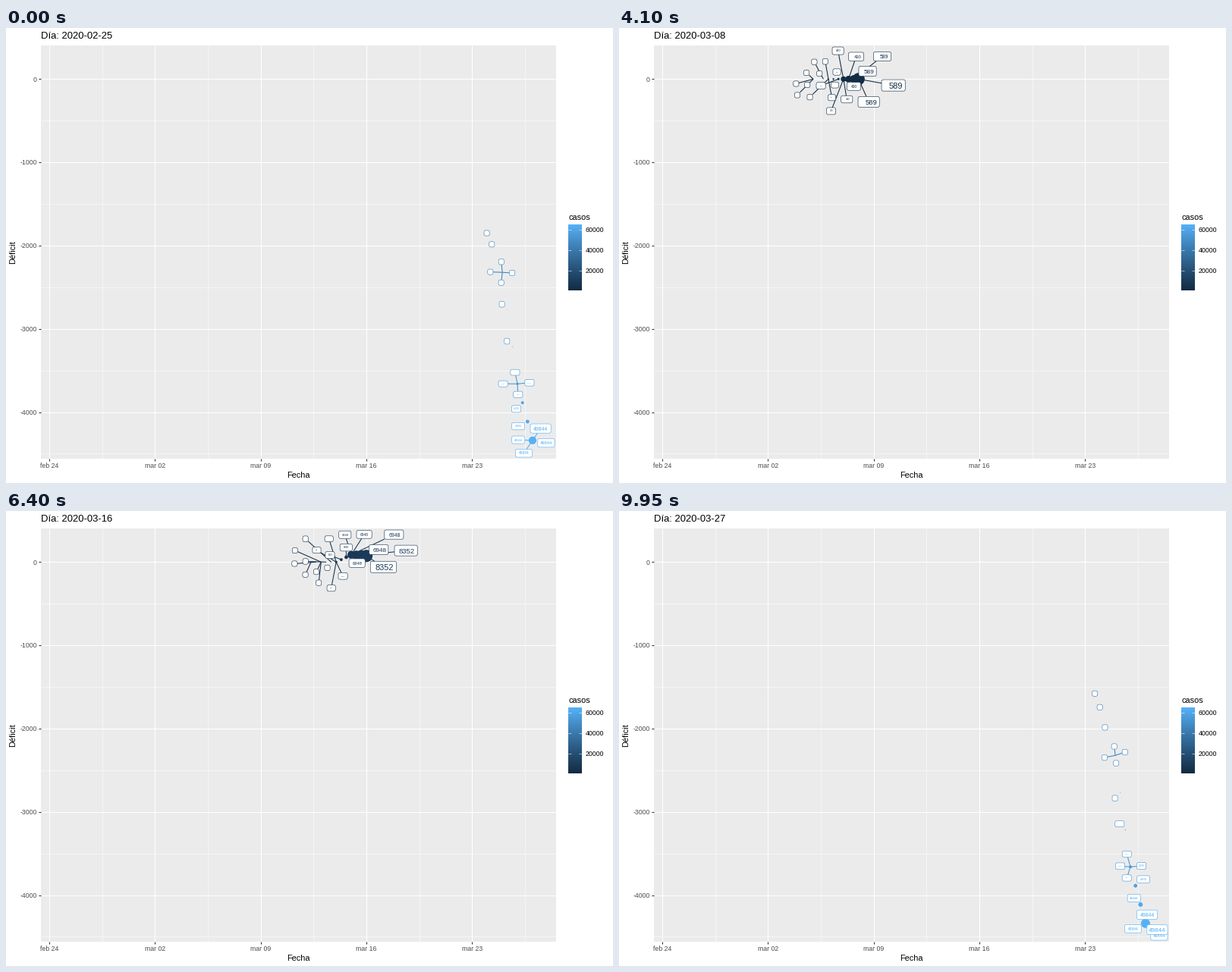
Write a matplotlib script that moves like this. It is 800 by 600 pixels and loops after 10000 ms.

```python
import numpy as np
import matplotlib.pyplot as plt
from matplotlib.animation import FuncAnimation
from matplotlib.collections import LineCollection, PolyCollection

plt.rcParams["font.family"] = "Liberation Sans"
PX = 0.72                        # points per pixel at 100 dpi
FRAMES, WAKE = 200, 20
FIRST, LAST = 7, 31              # days after the start that have data
LEFT, RIGHT, TOP, BOTTOM = 46, 725, 23, 568
DAY, WEEK, STEP = 19.905, 139.335, 109.8
PAD = 3.6


def active_on(day):
    """Active cases: exponential growth between a few known days."""
    known = {7: 163, 11: 430, 12: 589, 14: 1452, 15: 1898, 19: 6948,
             20: 8352, 26: 24277, 27: 27552, 31: 49844}
    return np.exp(np.interp(day, list(known), np.log(list(known.values()))))


def cases_on(day):
    n = active_on(day)
    return n * (1 + 0.285 * n / 49844)


def deficit_on(day):
    known = {18: 0, 19: 87, 20: 73, 24: 0, 25: -300, 26: -410, 27: -774,
             28: -1516, 29: -2322, 30: -3661, 31: -4340}
    return np.interp(day, list(known), list(known.values()))


def to_lab(rgb):
    c = np.asarray(rgb) / 255
    c = np.where(c > 0.04045, ((c + 0.055) / 1.055) ** 2.4, c / 12.92)
    m = np.array([[.4124, .3576, .1805], [.2126, .7152, .0722], [.0193, .1192, .9505]])
    x, y, z = np.cbrt(m @ c / np.array([.9505, 1, 1.089]))
    return np.array([116 * y - 16, 500 * (x - y), 200 * (y - z)])


def from_lab(lab):
    l, a, b = np.moveaxis(lab, -1, 0)
    y = (l + 16) / 116
    xyz = np.stack([y + a / 500, y, y - b / 200], -1) ** 3 * [.9505, 1, 1.089]
    m = np.array([[3.2406, -1.5372, -.4986], [-.9689, 1.8758, .0415], [.0557, -.2040, 1.0570]])
    c = np.clip(xyz @ m.T, 0, 1)
    return np.clip(np.where(c > 0.0031308, 1.055 * c ** (1 / 2.4) - 0.055, 12.92 * c), 0, 1)


LOW, HIGH = to_lab((19, 43, 67)), to_lab((86, 177, 247))


def blue(n):
    u = np.clip(np.asarray(n, float) / 64059, 0, 1)[..., None]
    return from_lab(LOW + u * (HIGH - LOW))


# Each day holds, then glides to the next one in three steps.
def landing(k):
    return min(7 * k - 1, 6 * k + 8)


keys, vals = [], []
for k in range(FIRST, LAST + 1):
    keys += [landing(k), landing(k + 1) - 3]
    vals += [k, k]

ages = np.arange(WAKE + 1)
moment = (np.arange(FRAMES)[:, None] - ages) % FRAMES
alive = (moment >= landing(FIRST)) & (moment <= landing(LAST) + 3)
day = np.interp(moment, keys, vals)
anchor = np.stack([57 + DAY * (day + 1),
                   67.3 - STEP * deficit_on(day) / 1000], -1).astype("f4")
colors = blue(cases_on(day))
value = np.rint(active_on(np.rint(day))).astype(int)

# Wake: sizes fall off with the cube of the age.
scale = (1 - ages / (WAKE + 1)) ** 3
font = 11 * scale
digit = np.maximum(np.rint(0.556 * font - 0.1), font > 0.7)
space = np.rint(0.278 * font)
count = np.floor(np.log10(value)).astype(int) + 1
width = count * digit + (5 - count) * space + 2 * PAD
height = np.broadcast_to(0.72 * font + 2 * PAD, width.shape)
half = (np.stack([width, height], -1) / 2).astype("f4")


def repel(steps=280, force=300.0, pull=0.01):
    """Push overlapping labels apart in all frames at once, cooling down."""
    rng = np.random.default_rng(4)
    # New labels lean right of their dots, old ones trail to the left.
    lean = np.stack(np.broadcast_arrays(20 - 4.0 * ages, 0 * day), -1)
    pos = (anchor + lean + rng.normal(0, (1, 6), anchor.shape)).astype("f4")
    vel = np.zeros_like(pos)
    pair = alive[:, :, None] & alive[:, None]
    others = pair & ~np.eye(WAKE + 1, dtype=bool)
    reach = half[:, :, None] + half[:, None] + 2 * PAD
    near = half[:, :, None] + PAD
    lo = np.array([LEFT, TOP], "f4") + half + 2
    hi = np.array([RIGHT, BOTTOM], "f4") - half - 2

    def push(d, limit, mask):
        a = np.abs(d)
        hit = (a < limit).all(-1) & mask
        r2 = np.maximum((d * d).sum(-1), 16)
        f = d * (hit * np.float32(force) / (r2 * np.sqrt(r2)))[..., None]
        wide = a[..., 0] > a[..., 1]
        f[..., 1] *= 1 + wide
        f[..., 0] *= 2 - wide
        return f.sum(2), hit.any(2)

    for _ in range(steps):
        f1, h1 = push(pos[:, :, None] - pos[:, None], reach, others)
        f2, h2 = push(pos[:, :, None] - anchor[:, None], near, pair)
        free = ~(h1 | h2)[..., None]
        f = np.clip(f1 + f2, -6, 6) + pull * free * (anchor - pos)
        vel = (0.7 * vel + f).astype("f4")
        pos = np.clip(pos + vel, lo, hi)
        force *= 0.988
        pull *= 0.997
    return pos


label = repel()

ang = np.linspace(0, np.pi / 2, 5)
corner = np.concatenate([np.stack([np.cos(ang + q), np.sin(ang + q)], -1)
                         for q in np.arange(4) * np.pi / 2])
side = np.repeat([[1, 1], [-1, 1], [-1, -1], [1, -1]], 5, axis=0)


def rounded(c, h, r=2.2):
    return c + side * (h - r) + corner * r


fig = plt.figure(figsize=(8, 6), dpi=100, facecolor="white")
ax = fig.add_axes([0, 0, 1, 1])


def write(x, y, s, size, color="black", **kw):
    return ax.text(x, y, s, fontsize=size * PX, color=color, **kw)


def lines(segs, color, w, z):
    ax.add_collection(LineCollection(segs, colors=color, linewidths=w * PX,
                                     capstyle="butt", zorder=z))


# Panel, grid and axes
ax.add_patch(plt.Rectangle((LEFT, TOP), RIGHT - LEFT, BOTTOM - TOP, fc="#EBEBEB", lw=0, zorder=0))
gx = 57 + WEEK * np.arange(5)
gy = 67.3 + STEP * np.arange(5)
for shift, w in ((0.5, 0.55), (0, 1.07)):
    lines([[(x, TOP), (x, BOTTOM)] for x in gx + WEEK * shift], "white", w, 1)
    lines([[(LEFT, y), (RIGHT, y)] for y in gy + STEP * shift], "white", w, 1)
lines([[(x, BOTTOM), (x, BOTTOM + 3)] for x in gx], "#333333", 1.07, 1)
lines([[(LEFT - 3, y), (LEFT, y)] for y in gy], "#333333", 1.07, 1)
for x, s in zip(gx, ("feb 24", "mar 02", "mar 09", "mar 16", "mar 23")):
    write(x, 580, s, 8.8, "#4D4D4D", ha="center")
for i, y in enumerate(gy):
    write(41, y + 3.4, str(-1000 * i), 8.8, "#4D4D4D", ha="right")
write(385.5, 593, "Fecha", 11, ha="center")
write(9.5, 295.5, "Déficit", 11, ha="center", va="center", rotation=90)
title = write(46, 14, "", 13)

# Colour bar
write(741, 253, "casos", 11)
ax.imshow(blue(np.linspace(64059, 0, 86))[:, None], extent=(741, 758.5, 346.4, 260),
          aspect="auto", zorder=1)
for i in range(3):
    y = 265.7 + 27 * i
    lines([[(741, y), (744.5, y)], [(755, y), (758.5, y)]], "white", 0.55, 2)
    write(764, y + 3.4, str(60000 - 20000 * i), 8.8)

ax.set_xlim(0, 800)
ax.set_ylim(600, 0)
ax.axis("off")

dots = ax.scatter([], [], lw=0, zorder=3)
leads = ax.add_collection(LineCollection([], linewidths=1.07 * PX, zorder=4))
boxes = ax.add_collection(PolyCollection([], facecolors="white", linewidths=0.6 * PX, zorder=5))
texts = [write(0, 0, "", max(f, 1), ha="center", zorder=6) for f in font]


def draw(i):
    passed = sum(landing(k) - 1 <= i for k in range(1, LAST + 1))
    title.set_text(f"Día: {np.datetime64('2020-02-25') + passed}")

    live = [a for a in ages[::-1] if alive[i, a]]
    dots.set_offsets(anchor[i, live] if live else np.empty((0, 2)))
    dots.set_sizes((2 * 8.1 * scale[live] * PX) ** 2 if live else [])
    dots.set_facecolors(colors[i, live] if live else "none")

    segs, tints = [], []
    for a in live:
        c, v = label[i, a], anchor[i, a] - label[i, a]
        s = np.min(half[i, a] / np.maximum(np.abs(v), 1e-3))
        if (1 - s) * np.hypot(*v) > 7.2:
            segs.append([anchor[i, a], c + s * v])
            tints.append(colors[i, a])
    leads.set_segments(segs)
    leads.set_color(tints or "none")
    boxes.set_verts([rounded(label[i, a], half[i, a]) for a in live])
    boxes.set_edgecolor(colors[i, live] if live else "none")

    for a, t in enumerate(texts):
        t.set_visible(bool(alive[i, a] and font[a] > 1))
        if t.get_visible():
            x, y = label[i, a]
            t.set_text(str(value[i, a]))
            t.set_color(colors[i, a])
            t.set_position((x + half[i, a, 0] - PAD - count[i, a] * digit[a] / 2,
                            y + 0.36 * font[a]))
    return [title, dots, leads, boxes, *texts]


anim = FuncAnimation(fig, draw, frames=FRAMES, interval=50, repeat=True, repeat_delay=0)
plt.show()
```
